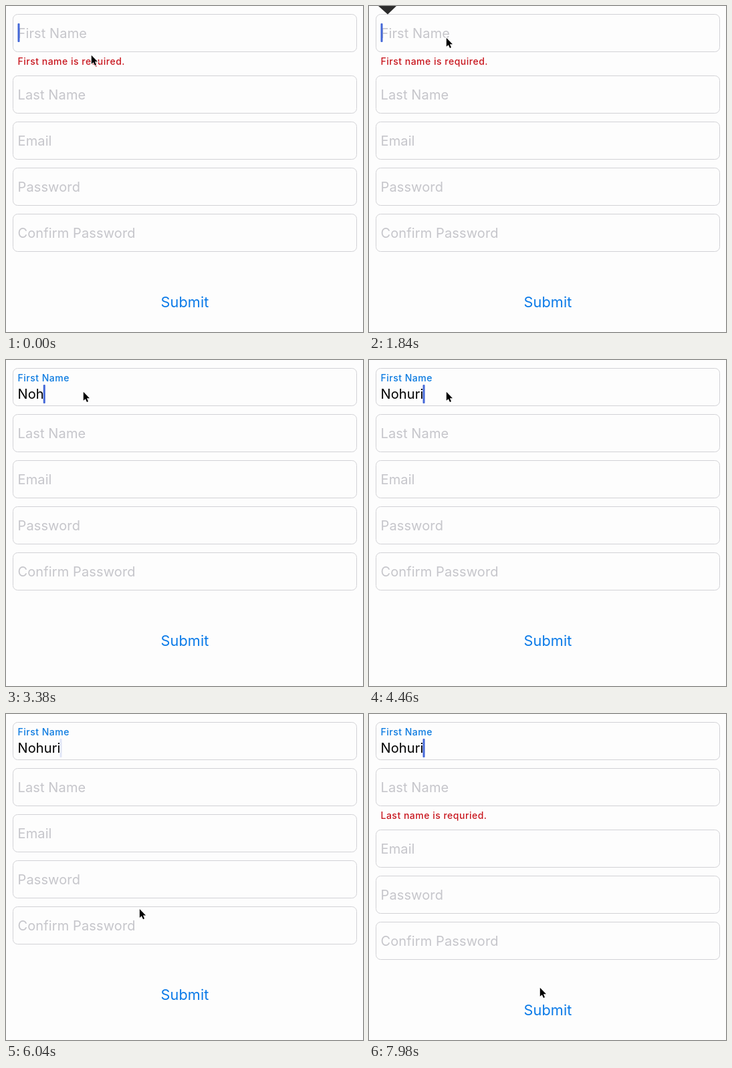
Animation, 534 px wide and 488 px high, one loop 8 s. Source, as an HTML page:

```html
<!DOCTYPE html>
<html lang="en">
<head>
<meta charset="utf-8">
<title>Sign-up form</title>
<style>
  html, body { margin: 0; width: 100%; height: 100%; overflow: hidden; background: #fdfdfd; }
  svg { display: block; width: 534px; height: 488px; font: 20px Inter, "Open Sans", sans-serif; letter-spacing: .12px; }
  .field { fill: none; stroke: #d2d2d6; }
  .hint { fill: #c6c6cb; }
  .small { font-size: 14px; font-weight: 500; letter-spacing: .5px; }
  .error { fill: #c8161e; }
  .label { fill: #0a7ae0; }
  .submit { fill: #0a7ae8; font-size: 21.7px; text-anchor: middle; }
  .caret { fill: #4468d8; }
</style>
</head>
<body>
<svg viewBox="0 0 534 488">
  <g id="fields"></g>
  <text id="firstError" class="small error" x="17.5" y="88">First name is required.</text>
  <text id="lastError" class="small error" x="17.5" y="157">Last name is requried.</text>
  <text id="label" class="small label" x="17.5">First Name</text>
  <text id="typed" x="17.5" y="58"></text>
  <rect id="caret" class="caret" width="3" height="28" rx="1"/>
  <text id="submit" class="submit" x="267.5" y="427.8">Submit</text>
  <path id="callout" d="M14 0H41L28 12.5Z" fill="#2c2c2c"/>
  <path id="pointer" d="M.8 .8V13.8L3.8 11.2L6 16L8 15.1L5.9 10.3H10Z"
        fill="#000" stroke="#fff" stroke-width="2" paint-order="stroke"/>
</svg>
<script>
const LOOP = 8000, ROW = 69, ERROR_HEIGHT = 23;
const NAME = "Nohuri";
const KEY_TIMES = [2400, 2960, 3280, 3560, 3820, 4080];
const BLINK = 900, BLINK_START = 6020;

// [time, x, y]
const POINTER = [
  [0, 127, 73], [520, 115, 47], [5300, 115, 47], [6040, 199, 291],
  [6600, 244, 380], [6880, 252, 405], [7240, 256, 414], [7540, 256, 414], [7900, 255, 409]
];

const el = id => document.getElementById(id);
const clamp = v => Math.min(1, Math.max(0, v));
const ramp = (t, from, to) => clamp((t - from) / (to - from));
const smooth = p => p * p * (3 - 2 * p);
const easeOut = p => 1 - (1 - p) ** 2;
const shift = (node, x, y) => node.setAttribute("transform", `translate(${x} ${y})`);

const rows = ["First Name", "Last Name", "Email", "Password", "Confirm Password"].map((hint, i) => {
  const row = document.createElementNS("http://www.w3.org/2000/svg", "g");
  const top = 12.5 + ROW * i;
  row.innerHTML = `<rect class="field" x="10.5" y="${top}" width="514" height="56" rx="7"/>
    <text class="hint" x="17.5" y="${top + 35}">${hint}</text>`;
  return el("fields").appendChild(row);
});
const firstHint = rows[0].querySelector("text");

function pointerAt(t) {
  const next = POINTER.findIndex(p => p[0] > t);
  if (next < 0) return POINTER.at(-1).slice(1);
  const [a, b] = [POINTER[next - 1], POINTER[next]];
  const p = ramp(t, a[0], b[0]);
  return [a[1] + (b[1] - a[1]) * p, a[2] + (b[2] - a[2]) * p];
}

function caretAlpha(t) {
  if (t >= KEY_TIMES[0] && t < 4460) return 1;
  const phase = ((t - BLINK_START) / BLINK % 1 + 1) % 1;
  return phase < .5 ? ramp(phase, 0, .15) : 1 - ramp(phase, .5, .7);
}

function draw(t) {
  const firstError = 1 - smooth(ramp(t, 2260, 2500));
  const lastError = smooth(ramp(t, 7560, 7860));
  rows.forEach((row, i) =>
    shift(row, 0, ERROR_HEIGHT * ((i > 0) * firstError + (i > 1) * lastError)));
  shift(el("submit"), 0, ERROR_HEIGHT * (firstError + lastError));
  el("firstError").style.opacity = firstError;
  el("lastError").style.opacity = lastError;

  const count = KEY_TIMES.filter(k => t >= k).length;
  const typed = el("typed");
  typed.textContent = NAME.slice(0, count);
  firstHint.style.opacity = count ? 0 : 1;

  const lift = easeOut(ramp(t, 2480, 2920));
  el("label").style.opacity = lift;
  el("label").setAttribute("y", 44 - 12 * lift);

  const caret = el("caret");
  caret.setAttribute("x", count ? 16.5 + typed.getComputedTextLength() : 17.5);
  caret.setAttribute("y", count ? 37 : 26);
  caret.style.opacity = caretAlpha(t);

  el("callout").style.opacity = ramp(t, 1400, 1560) * (1 - ramp(t, 2440, 2860));
  shift(el("pointer"), ...pointerAt(t));
}

const start = performance.now();
function tick() {
  draw((performance.now() - start) % LOOP);
  requestAnimationFrame(tick);
}
tick();
</script>
</body>
</html>
```
